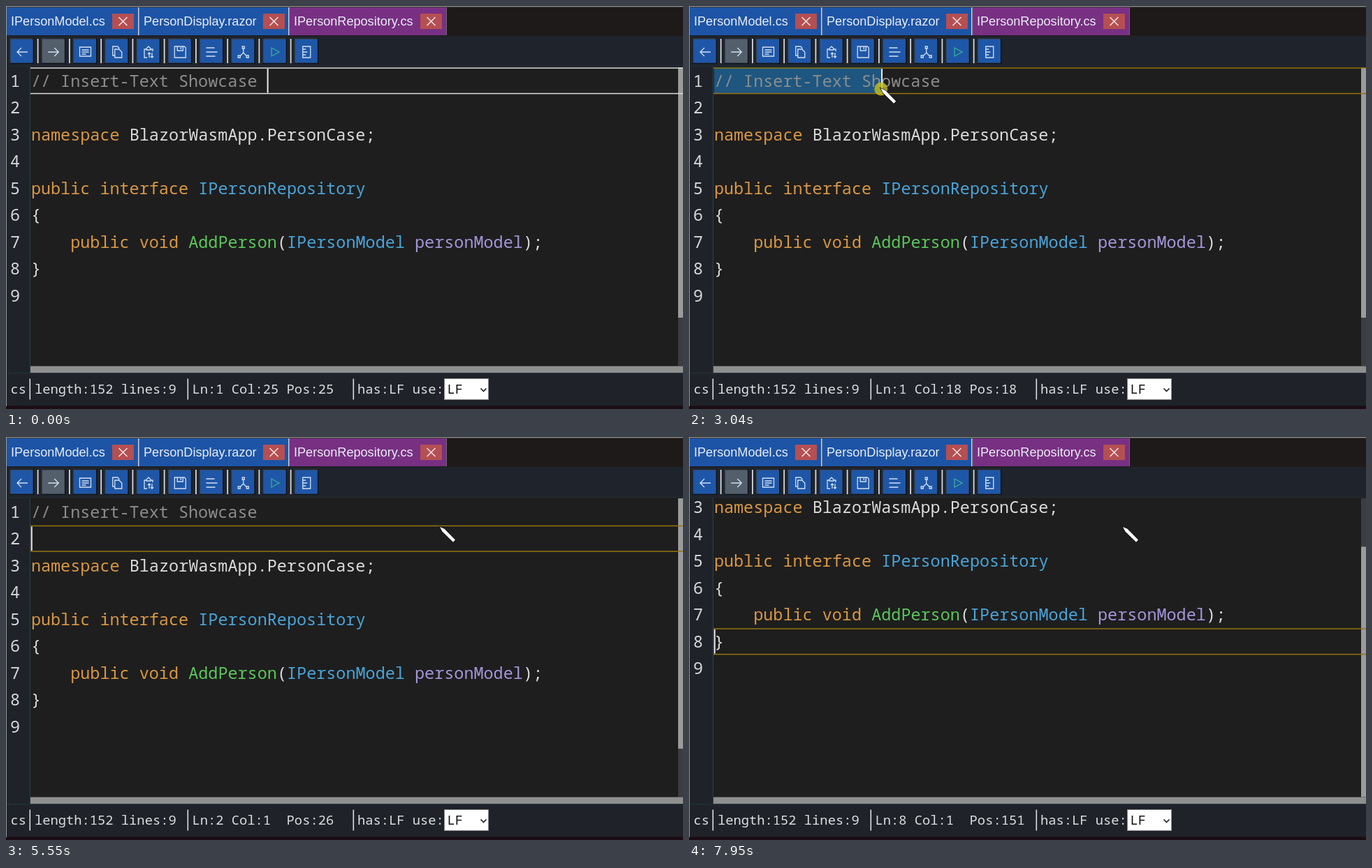
An HTML page with a canvas that plays this animation: 969x578 px, repeating every 8 s.

```html
<!DOCTYPE html>
<html lang="en">
<head>
<meta charset="utf-8">
<title>Code editor</title>
<style>
html, body { margin: 0; width: 100%; height: 100%; overflow: hidden; background: #1e1e1e; }
canvas { display: block; }
</style>
</head>
<body>
<canvas id="stage" width="969" height="578"></canvas>
<script>
const W = 969, H = 578, LOOP = 8000;
const ctx = document.getElementById('stage').getContext('2d');
const MONO = '"Noto Sans Mono", "DejaVu Sans Mono", monospace';
const SANS = '"Liberation Sans", Arial, sans-serif';
const CODE_SIZE = 23.467, CH = CODE_SIZE * 0.6, STATUS_SIZE = CODE_SIZE * 0.8;
const LEFT = 35.9, TOP = 88, ROW = 38.5;

const PLAIN = '#dcdcdc', KEY = '#d99743', TYPE = '#4aa4d9',
      METHOD = '#5bc65b', PARAM = '#a695d9', COMMENT = '#8c8c8c';
const LINES = [
  [['// Insert-Text Showcase ', COMMENT]],
  [],
  [['namespace ', KEY], ['BlazorWasmApp.PersonCase;', PLAIN]],
  [],
  [['public interface ', KEY], ['IPersonRepository', TYPE]],
  [['{', PLAIN]],
  [['\t', PLAIN], ['public void ', KEY], ['AddPerson', METHOD], ['(', PLAIN],
   ['IPersonModel ', TYPE], ['personModel', PARAM], [');', PLAIN]],
  [['}', PLAIN]],
  []
];
const lengths = LINES.map(l => l.reduce((n, [s]) => n + s.length, 0));

// time, x, y of the pointer tip
const PATH = [
  [110, 827, 539], [480, 440, 335], [860, 174, 176], [1420, 28, 117],
  [1620, 28, 117], [2220, 90, 116], [2420, 130, 116], [3040, 274, 118],
  [3230, 313, 118], [4070, 398, 121], [4410, 400, 122], [4630, 400, 122],
  [4660, 403, 132], [4790, 403, 132], [5280, 604, 142], [5460, 604, 142],
  [5550, 621, 129]
];
const PRESSES = [[1620, 4140], [4280, 4410], [5080, 5280]];
const CARET_ROWS = [[5080, 1], [6500, 2], [6670, 3], [6830, 4], [7030, 5], [7160, 6], [7360, 7]];
const SCROLLS = [[7620, ROW], [7820, 2 * ROW], [7950, 83.4]];
const CARET_HIDDEN = [[300, 1300], [5950, 6500]];

const latest = (steps, t) => steps.reduce((v, [at, value]) => t >= at ? value : v, 0);
const within = (spans, t) => spans.some(([a, b]) => t >= a && t < b);

function pointerAt(t) {
  if (t < PATH[0][0]) return null;
  const i = PATH.findIndex(p => p[0] > t);
  if (i < 0) return PATH[PATH.length - 1].slice(1);
  const [t0, x0, y0] = PATH[i - 1], [t1, x1, y1] = PATH[i];
  const k = (t - t0) / (t1 - t0);
  return [x0 + (x1 - x0) * k, y0 + (y1 - y0) * k];
}

function stateAt(t) {
  const pointer = pointerAt(t);
  const row = latest(CARET_ROWS, t);
  let col = 24;
  if (row) col = 0;
  else if (t >= 1620 && t < 4070) {
    col = Math.max(0, Math.min(24, Math.round((pointer[0] - 36) / CH - 0.35)));
  }
  return {
    pointer, row, col,
    focused: t >= 1620,
    selected: t >= 1620 && t < 4280 ? col : 0,
    pressed: within(PRESSES, t),
    caret: !within(CARET_HIDDEN, t),
    scroll: latest(SCROLLS, t)
  };
}

function rect(x, y, w, h, color) {
  ctx.fillStyle = color;
  ctx.fillRect(x, y, w, h);
}

function text(s, x, y, size, color, family = MONO) {
  ctx.font = `${size}px ${family}`;
  ctx.fillStyle = color;
  ctx.fillText(s, x, y);
}

function stroke(d, color, width = 1.4) {
  ctx.strokeStyle = color;
  ctx.lineWidth = width;
  ctx.stroke(new Path2D(d));
}

function tab(x, w, label, closeX, color) {
  rect(x, 2, w, 40, color);
  text(label, x + 6, 28, 18.1, '#e9edf3', SANS);
  rect(closeX, 11, 31, 22, '#b54f52');
  stroke(`M${closeX + 9.5} 16l12 12m0-12l-12 12`, '#f3e6e6', 1.5);
}

function drawTabs() {
  rect(0, 0, W, 43, '#1e1a19');
  tab(1, 188, 'IPersonModel.cs', 152, '#1d54a6');
  tab(191, 213, 'PersonDisplay.razor', 368, '#1d54a6');
  tab(406, 224, 'IPersonRepository.cs', 593, '#783083');
  rect(189, 2, 1.6, 40, '#c9d3e0');
  rect(404, 2, 1.6, 40, '#c9d3e0');
  rect(630, 2, 1, 40, '#6f6672');
  rect(0, 0, W, 1.3, '#909090');
}

// icon paths are centred on each button
const ICONS = [
  'M8 0H-7M-1-6L-7 0L-1 6',
  'M-8 0H7M1-6L7 0L1 6',
  'M-8-7H8V6H-8ZM-5-3H5M-5 0H5M-5 3H1',
  'M-3-4H3L7 0V8H-3ZM-3 5H-6V-8H1L3-6V-4',
  'M-2 8H-6V-4H-3M3-4H6V-1M-3-3V-5L0-8L3-5V-3ZM1 8V1M-1 3L1 1L3 3M5 1V8M3 6L5 8L7 6',
  'M-8-8H6L8-6V8H-8ZM-4-8V-2H4V-8M1-7V-4',
  'M-8-6H4M-8 0H8M-8 6H5',
  'M-1.5-8H1.5V-5H-1.5ZM0-5V1L-5 6M0 1L5 6M-7.5 5H-4.5V8H-7.5ZM4.5 5H7.5V8H4.5Z',
  'M-5-6L6 0L-5 6Z',
  'M-5.5-8H5.5V8H-5.5ZM-5.5-4H-1M-5.5 0H1M-5.5 4H-1'
];

function drawToolbar() {
  rect(0, 43, W, 44, '#1f242c');
  ICONS.forEach((icon, i) => {
    const x = 6 + i * 45.25;
    rect(x - 0.5, 46.5, 34.5, 36.5, '#0f1319');
    rect(x - 0.5, 46.5, 33, 35, '#39424e');
    rect(x + 0.8, 47.8, 31.7, 33.7, i === 1 ? '#535f6b' : '#1f57a8');
    if (i) rect(x - 6.5, 47, 1.8, 35, '#d5d8dc');
    ctx.save();
    ctx.translate(x + 17, 66);
    stroke(icon, i === 8 ? '#35b095' : '#d3e0f0', 1.3);
    ctx.restore();
  });
  rect(0, 86.5, W, 1, '#27363e');
}

function drawScrollbars(scroll) {
  rect(962, 88, 7, 428, '#3d3d41');
  rect(962, 88 + scroll * 0.832, 7, 359, '#9b9b9b');
  rect(35, 516.5, W - 35, 9.5, '#8f8f8f');
}

function drawEditor(s) {
  rect(0, 87, 35, 440, '#1f2329');
  rect(35, 87, W - 35, 440, '#1e1e1e');
  rect(34, 87, 1, 440, '#284149');
  drawScrollbars(s.scroll);

  ctx.save();
  ctx.beginPath();
  ctx.rect(0, 87.5, W, 429);
  ctx.clip();
  ctx.translate(0, TOP - s.scroll);
  const y = s.row * ROW;
  if (s.selected) rect(LEFT, y, s.selected * CH, 38, '#1e5680');
  LINES.forEach((line, i) => {
    const base = i * ROW + 27.5;
    text(i + 1, 6, base, CODE_SIZE, '#d6d8da');
    let x = LEFT;
    for (const [str, color] of line) {
      const shown = str.replace('\t', '    ');
      text(shown, x, base, CODE_SIZE, color);
      x += shown.length * CH;
    }
  });
  const edge = s.focused ? '#94740f' : '#dcdcdc';
  rect(35, y + 0.2, W - 35, 1.5, edge);
  rect(35, y + 36.8, W - 35, 1.5, edge);
  if (s.caret) rect(LEFT - 0.2 + s.col * CH, y + 2, 2, 34.5, '#ececec');
  ctx.restore();
}

function drawStatus({ row, col }) {
  const pos = lengths.slice(0, row).reduce((n, len) => n + len + 1, 0) + col + 1;
  const column = String(col + 1).padEnd(2);
  const total = lengths.reduce((n, len) => n + len + 1, -1);
  const label = (s, x, color = '#dcdee0') => text(s, x, 556, STATUS_SIZE, color);
  rect(0, 527, W, 46.5, '#1f2329');
  rect(0, 526.3, W, 1, '#27363e');
  rect(0, 573.5, W, 4.5, '#1b0d13');
  label('cs', 6.5);
  label(`length:${total} lines:${LINES.length}`, 41);
  label(`Ln:${row + 1} Col:${column} Pos:${pos}`, 266.5);
  label('has:LF use:', 503);
  for (const x of [33.5, 259.5, 496.5]) rect(x, 534.5, 1.6, 30, '#dcdee0');
  rect(627, 534, 64, 31, '#8a8a8a');
  rect(628, 535, 62, 29, '#ffffff');
  label('LF', 631.5, '#111111');
  stroke('M679.5 548.5l4 4l4-4', '#222222', 1.7);
}

function drawPointer({ pointer, pressed }) {
  if (!pointer) return;
  ctx.save();
  ctx.translate(...pointer);
  if (pressed) {
    ctx.fillStyle = 'rgba(205,196,22,0.76)';
    ctx.beginPath();
    ctx.arc(0.5, 1, 9.5, 0, Math.PI * 2);
    ctx.fill();
  }
  const pen = new Path2D('M0 0L6.5 2.8L22 18.6L19 21.8L3.4 6.6Z');
  ctx.strokeStyle = '#111111';
  ctx.lineWidth = 1.6;
  ctx.stroke(pen);
  ctx.fillStyle = '#ffffff';
  ctx.fill(pen);
  ctx.restore();
}

function draw(t) {
  const s = stateAt(t);
  ctx.clearRect(0, 0, W, H);
  drawTabs();
  drawToolbar();
  drawEditor(s);
  drawStatus(s);
  rect(0, 0, 1, 574, '#969a9e');
  drawPointer(s);
}

const start = performance.now();
function tick() {
  draw((performance.now() - start) % LOOP);
  requestAnimationFrame(tick);
}
tick();
</script>
</body>
</html>
```
